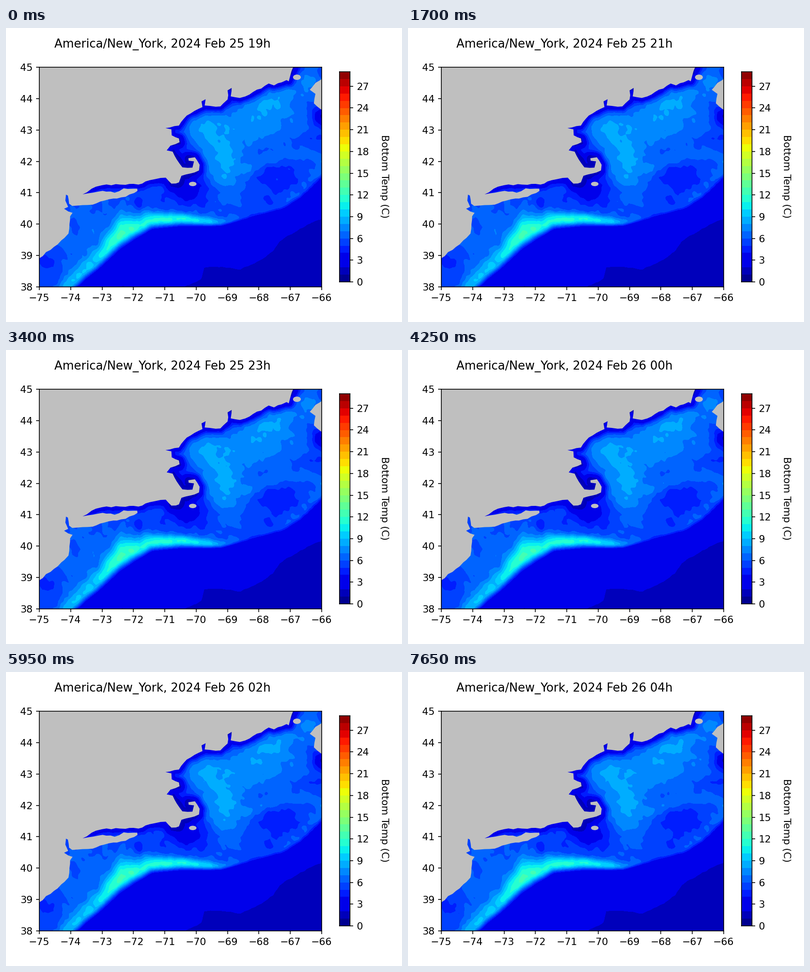
Recreate the animation shown at these times as a matplotlib script. Size 868 by 645 pixels, loop 8 s.

```python
import numpy as np
import matplotlib.pyplot as plt
from matplotlib.animation import FuncAnimation
from matplotlib.patches import Ellipse, Polygon

W, H = 868, 645
STEP, HOLD, LOOP = 50, 850, 8000
HOURS, LEVELS = 10, 29
LAND = "#bfbfbf"

plt.rcParams.update({"font.family": "DejaVu Sans", "font.size": 10.37})
rng = np.random.default_rng(8)

jet = plt.get_cmap("jet")
palette = [jet((i + 0.5) / LEVELS) for i in range(LEVELS)]
palette[2] = palette[3] = (0, 0, 0.92, 1)  # two steps share one blue

fig = plt.figure(figsize=(W / 150, H / 150), dpi=150, facecolor="white")


def add_axes(x0, y0, x1, y1):
    return fig.add_axes([x0 / W, 1 - y1 / H, (x1 - x0) / W, (y1 - y0) / H])


# Coastline from south-west to north-east, in degrees
COAST = [
    (-75.05, 38.88), (-74.64, 39.18), (-74.2, 39.56), (-74.07, 39.7),
    (-74.02, 40.14), (-73.94, 40.36), (-74.21, 40.49), (-74.08, 40.55),
    (-74.17, 40.75), (-74.15, 40.94), (-74.09, 40.91), (-74.05, 40.65),
    (-73.95, 40.58), (-73.3, 40.62), (-72.93, 40.75), (-72.25, 40.87),
    (-71.87, 41.06), (-71.88, 41.13), (-72.31, 41.14), (-72.6, 41.0),
    (-72.98, 41.06), (-73.62, 40.95), (-73.33, 41.13), (-73.0, 41.24),
    (-72.13, 41.28), (-71.84, 41.26), (-71.48, 41.4), (-70.97, 41.48),
    (-70.79, 41.29), (-70.55, 41.33), (-70.47, 41.54), (-69.91, 41.71),
    (-69.89, 41.89), (-70.04, 42.13), (-70.25, 42.1), (-70.24, 42.02),
    (-70.07, 42.0), (-70.12, 41.8), (-70.44, 41.81), (-70.62, 42.06),
    (-70.75, 42.31), (-70.94, 42.35), (-70.82, 42.5), (-70.53, 42.61),
    (-70.55, 42.73), (-70.78, 42.83), (-70.79, 43.02), (-70.98, 43.06),
    (-70.55, 43.14), (-70.3, 43.46), (-69.8, 43.73), (-69.83, 43.91),
    (-69.7, 43.98), (-69.73, 43.78), (-69.23, 43.75), (-69.0, 43.97),
    (-69.0, 44.26), (-68.87, 44.34), (-68.9, 44.07), (-68.61, 44.02),
    (-68.3, 44.13), (-67.69, 44.48), (-67.52, 44.42), (-67.12, 44.59),
    (-67.05, 44.55), (-66.89, 45.05)]
COLD_COAST = COAST[21:]
EAST_LAND = [(-65.9, 44.7), (-66.2, 44.5), (-66.38, 44.28), (-66.2, 44.15),
             (-66.25, 43.85), (-65.9, 43.58)]

# Foot of the continental slope, rim of the coldest deep water, bank front
SLOPE = [(-73.85, 37.8), (-73.45, 38.2), (-72.95, 38.6), (-72.42, 39.08),
         (-71.93, 39.44), (-71.38, 39.77), (-70.46, 39.86), (-69.22, 39.89),
         (-68.35, 40.11), (-67.15, 40.43), (-66.6, 40.79), (-65.9, 41.45)]
DEEP_RIM = [(-70.4, 38.0), (-69.85, 38.25), (-69.75, 38.63), (-69.2, 38.65),
            (-68.6, 38.55), (-67.9, 38.88), (-67.55, 39.15), (-67.35, 39.47),
            (-66.7, 39.85), (-65.9, 40.25)]
FRONT = [(-68.4, 41.75), (-67.9, 42.02), (-67.1, 42.2), (-66.4, 42.17),
         (-65.95, 41.95), (-66.2, 41.5), (-66.8, 41.0), (-67.2, 40.78)]

# Slope band by longitude: warmest value, width of its rise and of its fall
BAND_LON = [-74.6, -73.2, -72.4, -71.8, -70.5, -69.6, -69.0, -68.3, -66]
PEAK = [8.6, 9.4, 12.4, 11.4, 11.0, 9.6, 6.8, 5.3, 6.2]
RISE = [0.3, 0.3, 0.45, 0.35, 0.32, 0.2, 0.15, 0.2, 0.25]
FALL = [0.3, 0.35, 0.5, 0.3, 0.17, 0.15, 0.12, 0.15, 0.15]

# Bumps: lon, lat, half widths, tilt in degrees, strength
GULF = [(-69.1, 41.95, 0.65, 1.0, 0, 0.95), (-69.5, 42.9, 0.85, 0.7, 0, 0.85),
        (-68.0, 43.2, 1.1, 0.8, 0, 0.6), (-67.6, 43.85, 1.0, 0.5, 30, 0.85),
        (-66.4, 44.5, 0.35, 0.4, 0, 0.6), (-70.0, 43.2, 0.5, 0.4, 0, 0.5),
        (-66.7, 43.3, 0.6, 0.4, 0, 0.3)]
SHELF = [(-73.5, 39.6, 1.3, 1.1, 0, 1.1), (-74.75, 38.85, 0.4, 0.5, 0, -1),
         (-73.85, 39.9, 0.17, 0.25, 0, -1), (-71.83, 40.63, 0.2, 0.22, 0, -1.1),
         (-70.2, 41.1, 0.7, 0.43, 0, -2.6), (-70.45, 42.2, 0.4, 0.6, 0, -1.5),
         (-66.2, 42.75, 0.35, 0.13, 0, -1), (-66.0, 43.4, 0.3, 0.28, 0, -4),
         (-67.8, 40.55, 0.45, 0.12, 20, -0.7)]

lon, lat = np.meshgrid(np.linspace(-75, -66, 301), np.linspace(38, 45, 235))


def distance(line):
    """Distance of every grid point to a polyline."""
    best = np.full(lon.shape, np.inf)
    for (x0, y0), (x1, y1) in zip(line, line[1:]):
        dx, dy = x1 - x0, y1 - y0
        s = ((lon - x0) * dx + (lat - y0) * dy) / (dx * dx + dy * dy)
        s = np.clip(s, 0, 1)
        best = np.minimum(best, np.hypot(lon - x0 - s * dx, lat - y0 - s * dy))
    return best


def north_of(line):
    return lat - np.interp(lon, *np.transpose(line))


def bump(x, y, sx, sy, tilt, strength):
    c, s = np.cos(np.radians(tilt)), np.sin(np.radians(tilt))
    u, v = (lon - x) * c + (lat - y) * s, (lat - y) * c - (lon - x) * s
    return strength * np.exp(-(u / sx) ** 2 - (v / sy) ** 2)


def band(values):
    return np.interp(lon, BAND_LON, values)


waves = [(rng.uniform(0.2, 0.8), *rng.uniform(0, 2 * np.pi, 2),
          rng.uniform(-0.12, 0.12)) for _ in range(40)]


def ripples(hour):
    total = 0
    for length, angle, phase, speed in waves:
        along = lon * np.cos(angle) + lat * np.sin(angle)
        total = total + np.cos(2 * np.pi * along / length + phase + speed * hour)
    return 0.13 * total / np.sqrt(len(waves) / 2)


slope_dist = distance(SLOPE) * np.sign(north_of(SLOPE))
gulf = 1 - np.prod([1 - bump(*b) for b in GULF], axis=0)
shelf = 5.5 + 3 * gulf + sum(bump(*b) for b in SHELF)
shelf += 1.1 * np.exp(-(distance(FRONT) / 0.19) ** 2)
chill = np.interp(lon, [-71, -70.3], [2.6, 4])
shelf -= chill * np.exp(-(distance(COLD_COAST) / 0.18) ** 2)
deep = 2 + 0.6 * np.tanh(4 * north_of(DEEP_RIM))


def temperature(hour):
    pool = bump(-67.38 + 0.006 * hour, 41.46, 0.75, 0.6, 0, -1.05)
    base = shelf + pool + ripples(hour)
    past = np.maximum(slope_dist - band(RISE), 0)
    top = base + (band(PEAK) - base) * np.exp(-(past / band(FALL)) ** 2)
    top += 1.5 * ripples(hour) * np.exp(-past / 0.3)
    s = np.clip(slope_dist / band(RISE), 0, 1)
    field = deep + 0.2 * ripples(hour) + (top - deep) * s * s * (3 - 2 * s)
    return np.clip(field, 1.2, LEVELS - 0.1)


def rough(line, spacing=0.15, size=0.012):
    """Break long straight runs into small uneven ones."""
    out = []
    for a, b in zip(np.array(line), np.array(line[1:])):
        n = max(1, round(np.hypot(*(b - a)) / spacing))
        out.append(a)
        out += [a + (b - a) * k / n + rng.normal(0, size, 2)
                for k in range(1, n)]
    return out + [line[-1]]


ax = add_axes(73, 86, 692, 568)
maps = [ax.contourf(lon, lat, temperature(h), levels=range(LEVELS + 1),
                    colors=palette) for h in range(HOURS)]
ax.add_patch(Polygon(rough(COAST) + [(-75.05, 45.05)], fc=LAND))
ax.add_patch(Polygon(rough(EAST_LAND), fc=LAND))
ax.add_patch(Ellipse((-70.11, 41.28), 0.24, 0.14, fc=LAND))
ax.add_patch(Ellipse((-66.79, 44.68), 0.25, 0.17, fc=LAND))
ax.set(xlim=(-75, -66), ylim=(38, 45),
       xticks=range(-75, -65), yticks=range(38, 46))

cax = add_axes(731, 96, 754, 557)
cax.imshow(np.array(palette)[:, None], origin="lower", aspect="auto",
           extent=(0, 1, 0, LEVELS), interpolation="nearest")
cax.yaxis.tick_right()
cax.set(xticks=[], yticks=range(0, LEVELS, 3))
fig.text(829 / W, 1 - 326 / H, "Bottom Temp (C)", rotation=270,
         ha="center", va="center")
title = fig.text(106 / W, 1 - 43 / H, "", fontsize=12.45, va="baseline")


def update(frame):
    hour = min(frame * STEP // HOLD, HOURS - 1)
    days, clock = divmod(19 + hour, 24)
    title.set_text(f"America/New_York, 2024 Feb {25 + days} {clock:02d}h")
    for h, contours in enumerate(maps):
        contours.set_visible(h == hour)
    return [title]


anim = FuncAnimation(fig, update, frames=LOOP // STEP, interval=STEP,
                     repeat=True, repeat_delay=0, blit=False)
plt.show()
```
